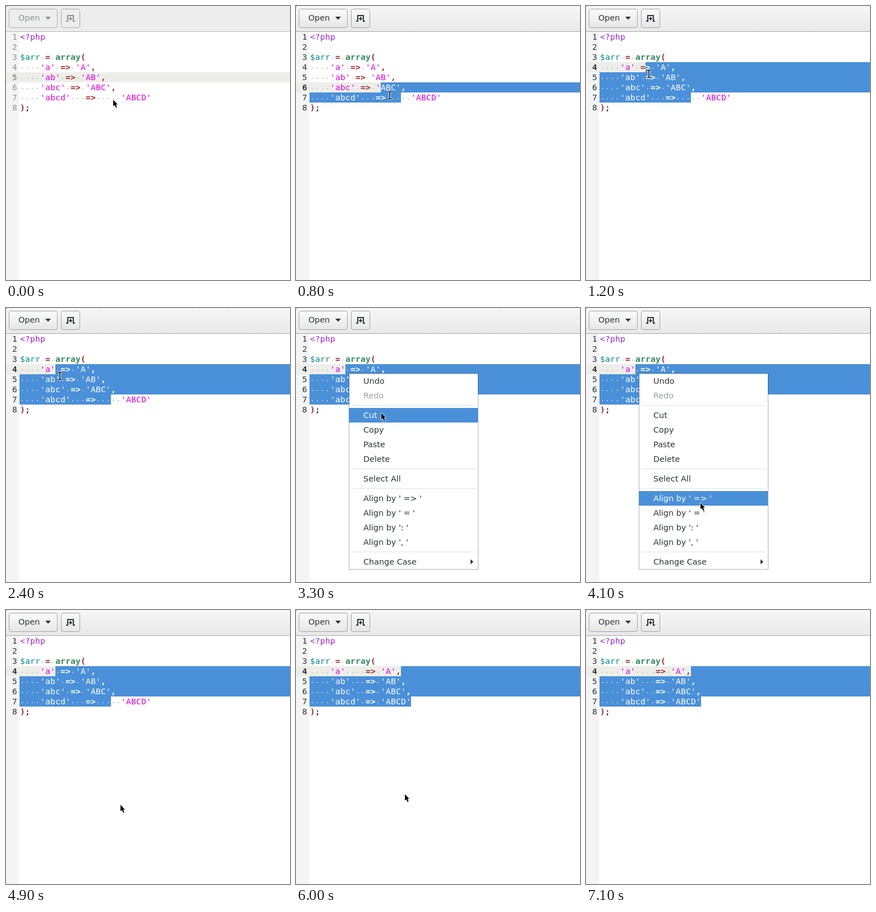
Animation, 506 px wide and 488 px high, one loop 7.6 s. Source, as an HTML page with a canvas:

```html
<!DOCTYPE html>
<html>
<head>
<meta charset="utf-8">
<style>
html, body { margin: 0; width: 100%; height: 100%; overflow: hidden; background: #fff; }
canvas { display: block; }
</style>
</head>
<body>
<canvas id="stage" width="506" height="488"></canvas>
<script>
const W = 506, H = 488, LOOP = 7600, STEP = 100;
const LEFT = 25, TOP = 46, CELL = 9, ROW = 18, ITEM = 26, GAP = 9;
const MONO = '14.67px "DejaVu Sans Mono", monospace';
const SANS = '14.4px "DejaVu Sans", sans-serif';
const BLUE = '#4a90d9', INK = '#2e3436', FADED = '#8e9192';
const FOCUS = 500, DRAG_END = 2700, MENU_OPEN = 2900, MENU_CLOSE = 4900, ALIGN = 5000, POINTER_OUT = 7100;
const g = document.getElementById('stage').getContext('2d');

const code = body => ['<?php', '', '$arr = array(', ...body, ');'].map(tokenize);
const ragged = code(["    'a' => 'A',", "    'ab' => 'AB',", "    'abc' => 'ABC',", "    'abcd'   =>     'ABCD'"]);
const aligned = code(["    'a'    => 'A',", "    'ab'   => 'AB',", "    'abc'  => 'ABC',", "    'abcd' => 'ABCD'"]);

const menu = [['Undo', 'Redo'], ['Cut', 'Copy', 'Paste', 'Delete'], ['Select All'],
  ["Align by ' => '", "Align by ' = '", "Align by ': '", "Align by ', '"], ['Change Case']];

const linear = p => p;
const easeIn = p => p ** 1.6;
const easeOut = p => 1 - (1 - p) ** 2;

// Pointer moves: begin, end, destination, easing
const moves = [
  [300, 500, 191, 177, linear],
  [500, 1100, 119, 123, easeIn],
  ...[0, 1, 2, 3].map(k => [1190 + 400 * k, 1200 + 400 * k, 112 - k * 16 / 3, 121, linear]),
  [2800, MENU_OPEN, 95, 116, linear],
  [MENU_OPEN, 3300, 152, 187, linear],
  [3300, 3700, 195, 295, easeOut],
  [3700, 3900, 200, 330, linear],
  [4000, 4100, 204, 347, linear],
  [5800, 6200, 184, 308, linear],
  [6300, 7000, 32, 28, linear],
];

function pointerAt(t) {
  let x = 191, y = 167;
  for (const [begin, end, toX, toY, ease] of moves) {
    if (t <= begin) break;
    const k = ease(Math.min(1, (t - begin) / (end - begin)));
    x += (toX - x) * k;
    y += (toY - y) * k;
  }
  return [x, y];
}

// Line and column where the selection starts; it runs slightly ahead of the drawn pointer.
function headAt(t) {
  if (t < FOCUS) return [5, 0];
  if (t >= ALIGN) return [4, 18];
  const [x, y] = pointerAt(Math.min(t + STEP / 2, DRAG_END));
  return [Math.floor((y - 6 - TOP) / ROW) + 1, Math.floor((x - 4 - LEFT) / CELL)];
}

function tokenize(line) {
  const cells = [];
  for (const [token] of line.matchAll(/'\w+'|\$\w+|<\?php|\w+|./g)) {
    const [color, bold] = token[0] === "'" ? ['#e000e0'] : token[0] === '$' ? ['#008a8c'] :
      token === '<?php' ? ['#9a20d8'] : token === 'array' ? ['#2e8b57', true] :
      token === ';' ? ['#000'] : ['#a52a2a', true];
    for (const ch of token) cells.push({ ch, color, bold });
  }
  return cells;
}

function rect(color, x, y, w, h) {
  g.fillStyle = color;
  g.fillRect(x, y, w, h);
}

function text(str, x, y, color, font) {
  g.fillStyle = color;
  g.font = font;
  g.fillText(str, x, y);
}

function shade(y, h, from, to) {
  const fill = g.createLinearGradient(0, y, 0, y + h);
  fill.addColorStop(0, from);
  fill.addColorStop(1, to);
  return fill;
}

function stroke(path, color, width) {
  g.strokeStyle = color;
  g.lineWidth = width;
  g.stroke(new Path2D(path));
}

function fill(path, color) {
  g.fillStyle = color;
  g.fill(new Path2D(path));
}

function drawToolbar(active) {
  const ink = active ? INK : FADED;
  rect(active ? shade(0, 45, '#f6f6f6', '#e9e9e9') : '#ededed', 0, 0, W, 45);
  rect(active ? '#a6a6a6' : '#b8b8b8', 0, 45, W, 1);
  for (const [x, w] of [[5.5, 86], [98.5, 33]]) {
    g.beginPath();
    g.roundRect(x, 5.5, w, 33, 3);
    g.fillStyle = active ? shade(5, 34, '#fbfbfb', '#e6e6e6') : '#ededed';
    g.fill();
    g.lineWidth = 1;
    g.strokeStyle = active ? '#a1a1a1' : '#a9a9a9';
    g.stroke();
  }
  text('Open', 22, 26, ink, SANS);
  fill('M70 19H80L75 24.5Z', ink);
  stroke('M107 27H110V17H120V27H123M112 22.5H118M115 19.5V25.5', ink, 2);
  rect('#000', 0, 0, 1, 1);
}

function drawCode(t, active) {
  const [line, col] = headAt(t);
  const endCol = t >= ALIGN ? 20 : 18;
  rect('#f4f4f4', 0, TOP, 23, H - TOP);
  rect('#edeee9', 0, TOP + (line - 1) * ROW, W, ROW);

  (t >= ALIGN ? aligned : ragged).forEach((cells, i) => {
    const n = i + 1, y = TOP + i * ROW;
    const from = n === line ? col : 0, to = n === 7 ? endCol : Infinity;
    const marked = active && n >= line && n <= 7;
    if (marked) {
      const x = from ? LEFT + from * CELL : LEFT - 1;
      rect(BLUE, x, y, Math.min(W, LEFT + to * CELL) - x, ROW);
    }
    text(n, 11, y + 14, active ? INK : FADED, (n === line ? 'bold ' : '') + MONO);
    cells.forEach(({ ch, color, bold }, c) => {
      const x = LEFT + c * CELL, on = marked && c >= from && c < to;
      if (ch === ' ') rect(on ? '#a9c4dd' : '#c6c6c6', x + 3, y + 10, 2, 2);
      else text(ch, x, y + 14, on ? '#fff' : color, (bold ? 'bold ' : '') + MONO);
    });
  });
}

function drawMenu(pointerY) {
  rect('rgba(0,0,0,.3)', 94, 116, 231, 350);
  rect('#fff', 95, 117, 229, 348);
  let y = 117;
  menu.forEach((group, i) => {
    if (i) {
      rect('#e2e2e2', 99, y + 4, 221, 1);
      y += GAP;
    }
    for (const label of group) {
      const off = label === 'Redo';
      const hover = !off && pointerY >= y && pointerY < y + ITEM;
      if (hover) rect(BLUE, 94, y, 230, ITEM);
      text(label, 120, y + 18, hover ? '#fff' : off ? '#9a9c9b' : INK, SANS);
      y += ITEM;
    }
  });
  fill('M311 447.5L316 452L311 456.5Z', INK);
}

function drawPointer(x, y, beam) {
  g.save();
  g.translate(Math.round(x), Math.round(y));
  g.lineJoin = 'round';
  if (beam) {
    const bar = 'M-3.5 -6.5H-1L0 -5.5L1 -6.5H3.5M0 -5.5V5.5M-3.5 6.5H-1L0 5.5L1 6.5H3.5';
    stroke(bar, '#fff', 3.4);
    stroke(bar, '#000', 1.5);
  } else {
    const arrow = 'M0 0V11.5L2.6 9.2L4.7 14L6.7 13.1L4.6 8.5H8Z';
    stroke(arrow, '#fff', 1.6);
    fill(arrow, '#000');
  }
  g.restore();
}

function draw(now) {
  const t = Math.floor(now % LOOP / STEP) * STEP;
  const active = t >= FOCUS;
  const [x, y] = pointerAt(t);
  rect('#fff', 0, 0, W, H);
  drawCode(t, active);
  drawToolbar(active);
  if (t >= MENU_OPEN && t < MENU_CLOSE) drawMenu(y);
  if (t < POINTER_OUT) drawPointer(x, y, active && t < MENU_OPEN);
}

const start = performance.now();
function tick() {
  draw(performance.now() - start);
  requestAnimationFrame(tick);
}
tick();
</script>
</body>
</html>
```
